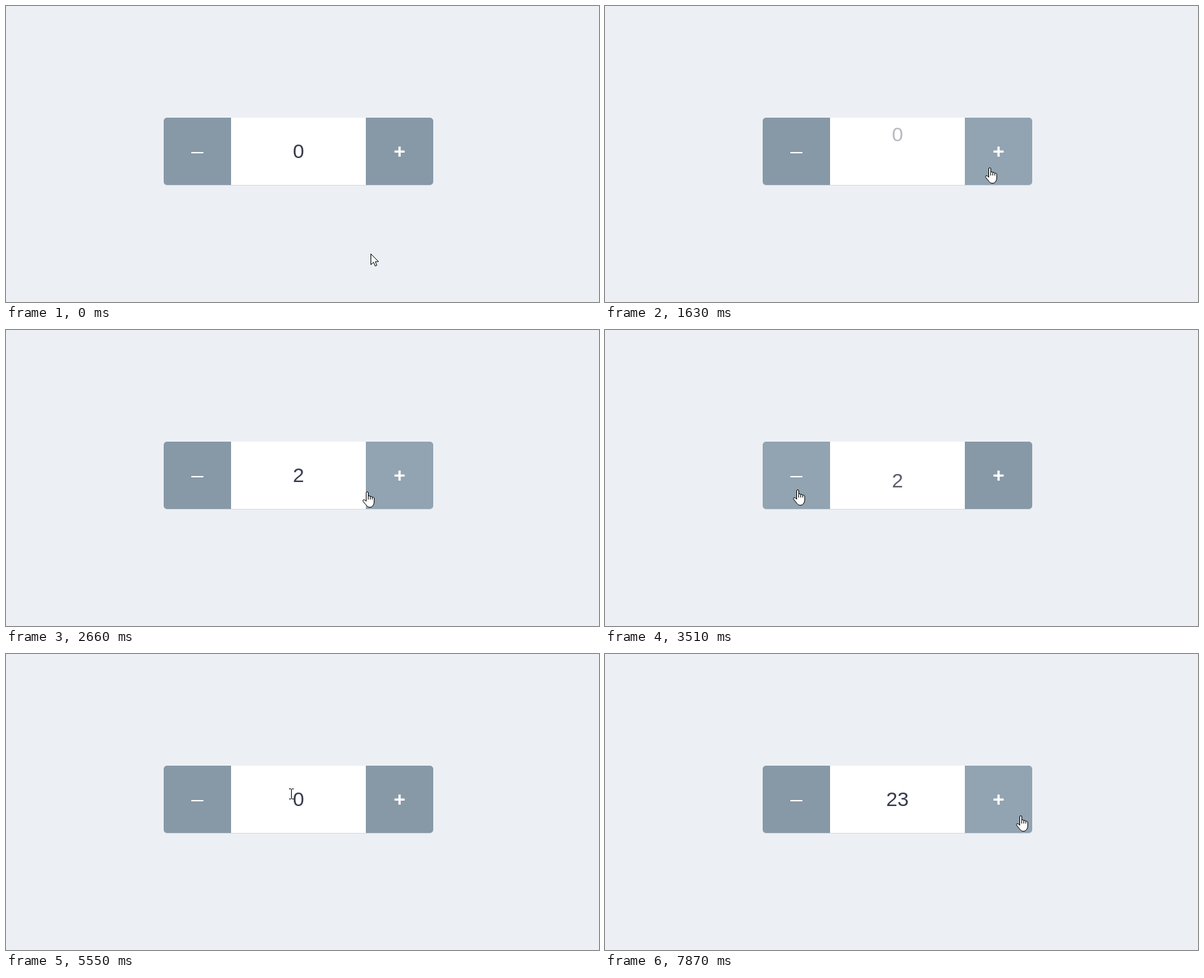
Write an HTML page that moves like this. It is 880 px wide and 440 px high and loops after 8 s.

```html
<!DOCTYPE html>
<html lang="en">
<head>
<meta charset="utf-8">
<title>Number stepper</title>
<style>
  html, body { margin: 0; width: 100%; height: 100%; overflow: hidden; background: #ecf0f5; }
  svg { display: block; }
  text { font: 30px "Liberation Sans", Arial, sans-serif; text-anchor: middle; }
  .plus { font-weight: bold; fill: #fff; }
  .cursor { fill: #fff; stroke: #000; stroke-linejoin: round; }
</style>
</head>
<body>
<svg width="880" height="440" viewBox="0 0 880 440">
  <rect x="234" y="167" width="400" height="100" rx="5" fill="#d3dae0"/>
  <rect x="334" y="166" width="200" height="100" fill="#fff"/>
  <path id="minus" d="M334 166H239a5 5 0 0 0-5 5v90a5 5 0 0 0 5 5h95z"/>
  <path id="plus" d="M534 166h95a5 5 0 0 1 5 5v90a5 5 0 0 1-5 5h-95z"/>
  <rect x="275" y="217" width="18" height="2" fill="#fff"/>
  <text class="plus" x="584" y="225.5">+</text>
  <rect id="selection" x="426" y="199" width="16" height="33" fill="#3297fd"/>
  <text id="value" x="434" y="226"></text>
  <rect id="caret" y="199" width="1" height="33" fill="#363b4c"/>
  <g class="cursor">
    <path id="arrow" d="M.5.5V16.5L4.4 12.9 6.9 18.5 9.3 17.5 7 12H11.8Z"/>
    <g id="hand">
      <path d="M5.5 14.5V2Q5.5.5 7 .5T8.5 2V7.5Q8.5 6.5 10 6.5T11.5 8Q11.5 7.3 12.8 7.3T14.4 9Q14.4 8.3 15.7 8.5T17.3 10V16Q17.3 19 15.5 21 14.5 23.5 11 23.5 8 23.5 6.5 21.5L1 14.8Q.2 12.8 1.5 12.2 3 11.8 5.5 14.5Z"/>
      <path d="M8.5 7.5V12M11.5 8V12M14.4 9V12" fill="none"/>
    </g>
    <path id="beam" fill="none" d="M0 .5h3m1 0h3M3.5 1v14M0 15.5h3m1 0h3"/>
  </g>
</svg>
<script>
const LOOP = 8000, STEP = 43;
const el = id => document.getElementById(id);
const COLORS = { rest: '#8798a7', hover: '#92a3b1', active: '#788997' };

// Each move: start, end, number of steps, path of [progress, x, y]
const moves = [
  [60, 560, 10, [[0, 541, 368], [.4, 558, 347], [.8, 581, 317], [1, 584, 313]]],
  [840, 1190, 8, [[0, 584, 313], [.375, 574, 250], [1, 570, 240]]],
  [2630, 3060, 10, [[0, 570, 240], [.2, 500, 239], [.6, 164, 263], [1, 285, 237]]],
  [4240, 4360, 3, [[0, 285, 237], [1, 388.5, 222]]],
  [5090, 5200, 3, [[0, 388.5, 222], [1, 451.5, 186]]],
  [5380, 5550, 4, [[0, 451.5, 186], [1, 423.5, 208]]],
  [5840, 5970, 4, [[0, 423.5, 208], [1, 462.5, 212]]],
  [6150, 6150, 1, [[0, 462.5, 212], [1, 462.5, 213]]],
  [7410, 7870, 9, [[0, 462.5, 213], [.4, 532, 224], [.85, 618, 239], [1, 616, 240]]]
];

// Poses of a digit swap: [uses new value, offset, opacity]
const quick = [[0, 8, .82], [0, 25, .35], [1, -26, .35]];
const full = [[0, 8, .82], [0, 25, .35], [1, -37, .15], [1, -10, .75]];

// Each change: time, new value, direction, poses
const changes = [
  [0, '0', 1, []],
  [1580, '1', -1, quick],
  [2275, '2', -1, full],
  [3510, '1', 1, full],
  [4110, '0', 1, quick],
  [6910, '2', 1, []],
  [7130, '23', 1, []]
];

const within = (t, from, to) => t >= from && t < to;

function along(path, p) {
  const i = Math.max(1, path.findIndex(q => q[0] >= p));
  const [a, b] = [path[i - 1], path[i]];
  const k = (p - a[0]) / (b[0] - a[0]);
  return { x: a[1] + (b[1] - a[1]) * k, y: a[2] + (b[2] - a[2]) * k };
}

function cursorAt(t) {
  const move = moves.filter(m => m[0] <= t).pop();
  if (!move) return along(moves[0][3], 0);
  const [from, to, n, path] = move;
  const step = t >= to ? n : Math.floor((t - from) / (to - from) * (n - 1)) + 1;
  return along(path, step / n);
}

function zone({ x, y }) {
  if (!within(y, 166, 266) || !within(x, 234, 634)) return 'outside';
  return x < 334 ? 'minus' : x < 534 ? 'input' : 'plus';
}

function drawCursor(t) {
  const pos = cursorAt(t), where = zone(pos);
  const shape = { outside: 'arrow', input: 'beam' }[where] || 'hand';
  const [dx, dy] = { arrow: [0, 0], beam: [3.5, 8], hand: [6, 0] }[shape];
  for (const id of ['arrow', 'beam', 'hand']) el(id).style.display = id === shape ? '' : 'none';
  el(shape).setAttribute('transform', `translate(${Math.round(pos.x - dx)} ${Math.round(pos.y - dy)})`);
}

function drawButtons(t) {
  const hovered = zone(cursorAt(t - 30));
  for (const id of ['minus', 'plus']) el(id).setAttribute('fill', COLORS[id === hovered ? 'hover' : 'rest']);
  if (within(t, 2140, 2275)) el('plus').setAttribute('fill', COLORS.active);
}

function drawValue(t) {
  const i = changes.filter(c => c[0] <= t).length - 1;
  const [at, next, dir, poses] = changes[i];
  const [isNew, offset, opacity] = poses[Math.floor((t - at) / STEP)] || [1, 0, 1];
  const selected = within(t, 5880, 6910);
  const value = el('value');
  value.textContent = isNew ? next : changes[i - 1][1];
  value.setAttribute('y', 226 + offset * dir);
  value.setAttribute('opacity', opacity);
  value.setAttribute('fill', selected ? '#fff' : '#363b4c');
  el('selection').style.display = selected ? '' : 'none';
  el('caret').style.display = within(t, 6910, 7630) ? '' : 'none';
  el('caret').setAttribute('x', Math.floor(434 + 8.34 * next.length));
}

const start = performance.now();
function draw() {
  const t = (performance.now() - start) % LOOP;
  drawButtons(t);
  drawValue(t);
  drawCursor(t);
  requestAnimationFrame(draw);
}
draw();
</script>
</body>
</html>
```
